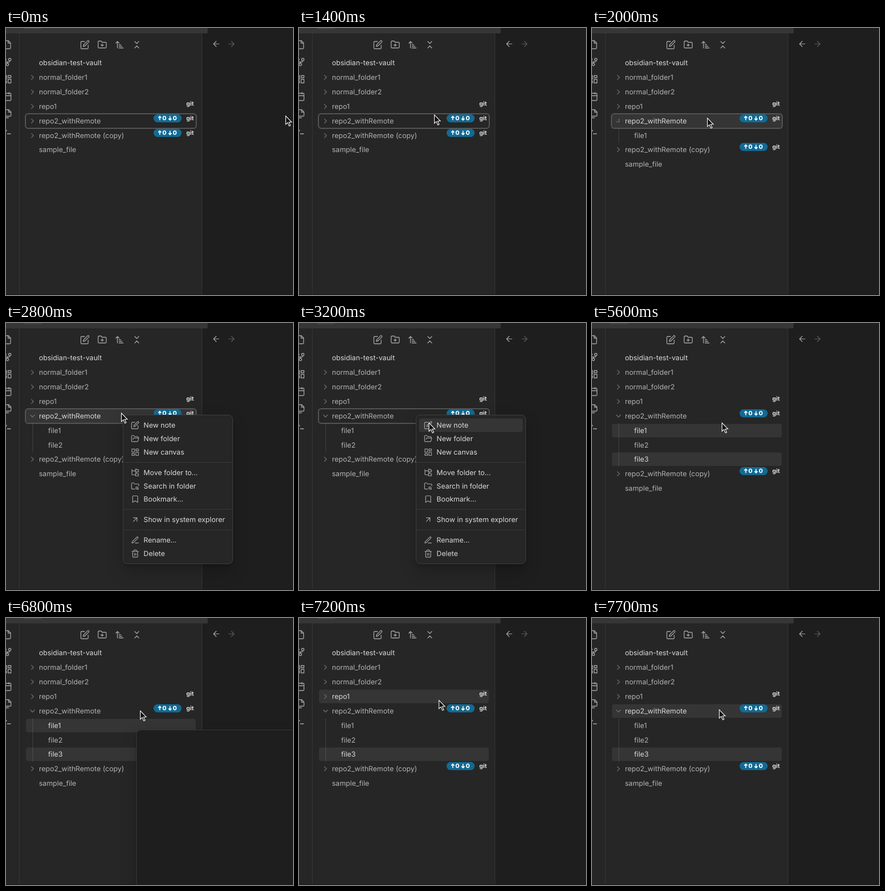
Recreate the animation shown at these times as an HTML page. Size 531 px wide and 495 px high, loop 8000 ms.

```html
<!DOCTYPE html>
<html lang="en">
<head>
<meta charset="utf-8">
<title>File explorer</title>
<style>
  html, body { margin: 0; width: 100%; height: 100%; overflow: hidden; background: #1e1e1e; }
  svg { display: block; }
  text { font: 13px Inter, sans-serif; fill: #b3b3b3; white-space: pre; text-rendering: geometricPrecision; }
  .hot { fill: #dadada; }
  .tag { font-size: 11px; font-weight: 700; fill: #dcddde; }
  .count { font-size: 11px; font-weight: 800; fill: #fff; }
  .icon { fill: none; stroke: #a8a8a8; stroke-width: 1.75; stroke-linecap: round; stroke-linejoin: round; }
  .chev { fill: none; stroke: #666; stroke-width: 1.6; stroke-linecap: round; stroke-linejoin: round; }
  .wash { fill: #fff; fill-opacity: .07; }
  .float { filter: drop-shadow(0 3px 3px rgba(0, 0, 0, .18)) drop-shadow(0 13px 14px rgba(0, 0, 0, .2)); }
</style>
</head>
<body>
<svg id="stage" width="531" height="495" viewBox="0 0 531 495">
  <rect width="531" height="495" fill="#1e1e1e"/>
  <rect width="362" height="495" fill="#262626"/>
  <path d="M24.5 10V495M362.5 10V495" stroke="#363636"/>
  <path d="M0 0H373V8.5Q373 10 371.5 10H0Z" fill="#363636"/>
  <path d="M33 0H67Q67 2 64 2H36Q33 2 33 0Z" fill="#444"/>
  <rect y="494" width="531" height="1" fill="#191717"/>
  <g id="chrome"></g>
  <g id="scene"></g>
</svg>
<script>
const LOOP = 8000, ROW = 26.9;
const $ = id => document.getElementById(id);

const edit = 'M11 4H4a2 2 0 0 0-2 2v14a2 2 0 0 0 2 2h14a2 2 0 0 0 2-2v-7M18.5 2.5a2.1 2.1 0 0 1 3 3L12 15l-4 1 1-4Z';
const board = 'M3 3h7v9H3ZM14 3h7v5h-7ZM14 12h7v9h-7ZM3 16h7v5H3Z';
const folder = 'M4 20h16a2 2 0 0 0 2-2V8a2 2 0 0 0-2-2h-8l-2.5-3H4a2 2 0 0 0-2 2v13a2 2 0 0 0 2 2Z';
const ring = (x, y, r) => `M${x - r} ${y}a${r} ${r} 0 1 0 ${2 * r} 0a${r} ${r} 0 1 0 ${-2 * r} 0`;

const ribbon = [
  'M4 22h14a2 2 0 0 0 2-2V7.5L14.5 2H6a2 2 0 0 0-2 2v3M14 2v6h6',
  ring(12, 18, 3) + ring(6, 6, 3) + ring(18, 6, 3) + 'M18 9v1a2 2 0 0 1-2 2H8a2 2 0 0 1-2-2V9M12 12v3',
  board,
  'M5 4h14a2 2 0 0 1 2 2v14a2 2 0 0 1-2 2H5a2 2 0 0 1-2-2V6a2 2 0 0 1 2-2ZM16 2v4M8 2v4M3 10h18',
  'M15.5 2H9a2 2 0 0 0-2 2v12a2 2 0 0 0 2 2h10a2 2 0 0 0 2-2V7.5ZM15 2v6h6M3 7.6V20a2 2 0 0 0 2 2h9.8',
  'M4 17l6-6-6-6M12 19h8'
];
const toolbar = [
  edit,
  folder + 'M12 10v6M9 13h6',
  'M3 8l4-4 4 4M7 4v16M11 12h4M11 16h7M11 20h10',
  'M7 20l5-5 5 5M7 4l5 5 5-5'
];
// label, baseline, icon
const menu = [
  ['New note', 194, edit],
  ['New folder', 219, 'M6 14l1.5-3a2 2 0 0 1 1.7-1H22l-2.4 8.5A2 2 0 0 1 18 20H4a2 2 0 0 1-2-2V5a2 2 0 0 1 2-2h4l2.5 3H18a2 2 0 0 1 2 2v2'],
  ['New canvas', 244, board],
  ['Move folder to...', 282, 'M13 10h8V4h-4l-1-2h-3ZM13 21h8v-6h-4l-1-2h-3ZM3 3v13a2 2 0 0 0 2 2h8M3 5a2 2 0 0 0 2 2h8'],
  ['Search in folder', 307, 'M11 20H4a2 2 0 0 1-2-2V5a2 2 0 0 1 2-2h4l2.5 3H20a2 2 0 0 1 2 2v3M21 21l-1.5-1.5' + ring(17, 17, 3)],
  ['Bookmark...', 331, 'M19 21l-7-4-7 4V5a2 2 0 0 1 2-2h10a2 2 0 0 1 2 2Z'],
  ['Show in system explorer', 369, 'M7 17L17 7M7 7h10v10'],
  ['Rename...', 407, 'M12 20h9M16.5 3.5a2.1 2.1 0 0 1 3 3L7 19l-4 1 1-4Z'],
  ['Delete', 432, 'M3 6h18M19 6v14a2 2 0 0 1-2 2H7a2 2 0 0 1-2-2V6M8 6V4a2 2 0 0 1 2-2h4a2 2 0 0 1 2 2v2M10 11v6M14 11v6']
];

const icon = (d, x, y, size, style = '') =>
  `<path class="icon" d="${d}" style="${style}" transform="translate(${x} ${y}) scale(${size / 24}) translate(-12 -12)"/>`;
const text = (s, x, y, cls = '') => `<text class="${cls}" x="${x}" y="${y}">${s}</text>`;
const wash = (y, x = 37, w = 314) => `<rect class="wash" x="${x}" y="${y - 17}" width="${w}" height="25" rx="4"/>`;
const line = i => Math.round(69 + ROW * i);
const kidLine = i => Math.round(69.15 + ROW * i);

$('chrome').innerHTML =
  ribbon.map((d, i) => icon(d, 2.5, 31 + 32 * i, 18)).join('') +
  toolbar.map((d, i) => icon(d, 146 + 32 * i, 31, 18)).join('') +
  icon('M12 19l-7-7 7-7M19 12H5', 389, 29.5, 17, 'stroke:#a8a8a8') +
  icon('M12 5l7 7-7 7M5 12h14', 417, 29.5, 17, 'stroke:#5c5c5c');

const gitTag = y => `<text class="tag" x="347.5" y="${y - 6}" text-anchor="end">git</text>`;

const pill = y => `<g transform="translate(0 ${y - 177})">
  <rect x="273" y="160" width="52" height="15" rx="7.5" fill="#126a94"/>
  <path d="M284.5 171V164M281.7 166.6L284.5 163.8L287.3 166.6M303.5 163.5V170.5M300.7 167.9L303.5 170.7L306.3 167.9"
    fill="none" stroke="#fff" stroke-width="1.7"/>
  ${text('0', 289.2, 171, 'count')}${text('0', 308.6, 171, 'count')}</g>`;

function folderRow(label, i, s, open = 0) {
  const y = line(i), hot = s.hover === label;
  return (hot ? wash(y) : '') +
    `<path class="chev" d="M-3.7-1.9L0 1.9L3.7-1.9" transform="translate(49 ${y - 4.5}) rotate(${90 * open - 90})"/>` +
    text(label, 61, y, hot ? 'hot' : '') +
    (label.startsWith('repo') ? gitTag(y) : '') +
    (label.startsWith('repo2') ? pill(y) : '');
}

function children(s) {
  const h = s.kids.length * ROW * s.open;
  if (!h) return '';
  const rows = s.kids.map((name, i) => {
    const y = kidLine(5 + i), hot = name === s.hover || i === 2;
    return (hot ? wash(y) : '') + text(name, 78, y, hot ? 'hot' : '');
  }).join('');
  return `<svg y="186" width="531" height="${h}" viewBox="0 186 531 ${h}">${rows}
    <path d="M49.5 186V${186 + h}" stroke="#fff" stroke-opacity=".13"/></svg>`;
}

function contextMenu(s) {
  return `<rect class="float" x="216.5" y="170.5" width="203" height="276" rx="8" fill="#262626" stroke="#404040"/>
    <path d="M217 258.5H419M217 345.5H419M217 383.5H419" stroke="#3a3a3a"/>` +
    (s.menuHot ? wash(194, 222, 192) : '') +
    menu.map(([label, y, d]) => icon(d, 239, y - 4.5, 16) + text(label, 254.6, y, 'hot')).join('');
}

const popover = '<rect class="float" x="241.5" y="207.5" width="320" height="320" rx="8" fill="#1e1e1e" stroke="#383838"/>';

const pointer = ([x, y]) => `<path transform="translate(${x} ${y})" fill="#111" stroke="#fff" stroke-width="1.1"
  d="M0 .5V16.2L3.6 12.9L6.4 19.3L8.8 18.2L6.1 12H11Z"/>`;

function draw(s) {
  const after = 5 + s.kids.length * s.open;
  return text('obsidian-test-vault', 61, line(0), 'hot') +
    ['normal_folder1', 'normal_folder2', 'repo1'].map((n, i) => folderRow(n, i + 1, s)).join('') +
    folderRow('repo2_withRemote', 4, s, s.open) +
    (s.ring ? '<rect x="36" y="159" width="316" height="27" rx="5" fill="none" stroke="#555" stroke-width="2"/>' : '') +
    children(s) +
    folderRow('repo2_withRemote (copy)', after, s) +
    text('sample_file', 61, line(after + 1)) +
    (s.menu ? contextMenu(s) : '') +
    (s.popover ? popover : '') +
    pointer(s.at);
}

const repo = 'repo2_withRemote';
// time, what changes
const steps = [
  [0, { at: [517.5, 162.5], hover: '', ring: true, open: 0, kids: ['file1', 'file2'], menu: false, menuHot: false, popover: false }],
  [1100, { at: [497, 160] }],
  [1200, { at: [400, 157] }],
  [1300, { at: [305, 157.5] }],
  [1400, { at: [250.5, 160.5] }],
  [1500, { at: [222, 165], hover: repo }],
  [1600, { at: [213.5, 166.5] }],
  [2000, { open: .5 }],
  [2100, { open: 1 }],
  [2800, { menu: true }],
  [3100, { at: [230, 178], hover: '' }],
  [3200, { at: [240.5, 184.5], menuHot: true }],
  [3600, { menu: false, ring: false, hover: 'file1' }],
  [3700, { kids: ['file1', 'file2', 'Untitled'] }],
  [5600, { kids: ['file1', 'file2', 'file3'] }],
  [6200, { popover: true }],
  [6800, { at: [248.5, 171.5] }],
  [6900, { at: [268.5, 146], hover: 'repo1' }],
  [7100, { at: [267, 147], popover: false }],
  [7200, { at: [259, 152] }],
  [7300, { at: [248, 160], hover: repo }],
  [7400, { at: [240, 165] }],
  [7500, { at: [236.3, 168] }],
  [7700, { at: [235.5, 169.5] }]
];
let state = {};
const scenes = steps.map(([start, change]) => ({ start, html: draw(state = { ...state, ...change }) }));

let shown;
function tick() {
  const t = performance.now() % LOOP;
  const now = scenes.findLast(scene => scene.start <= t);
  if (now !== shown) $('scene').innerHTML = (shown = now).html;
  requestAnimationFrame(tick);
}
tick();
</script>
</body>
</html>
```
